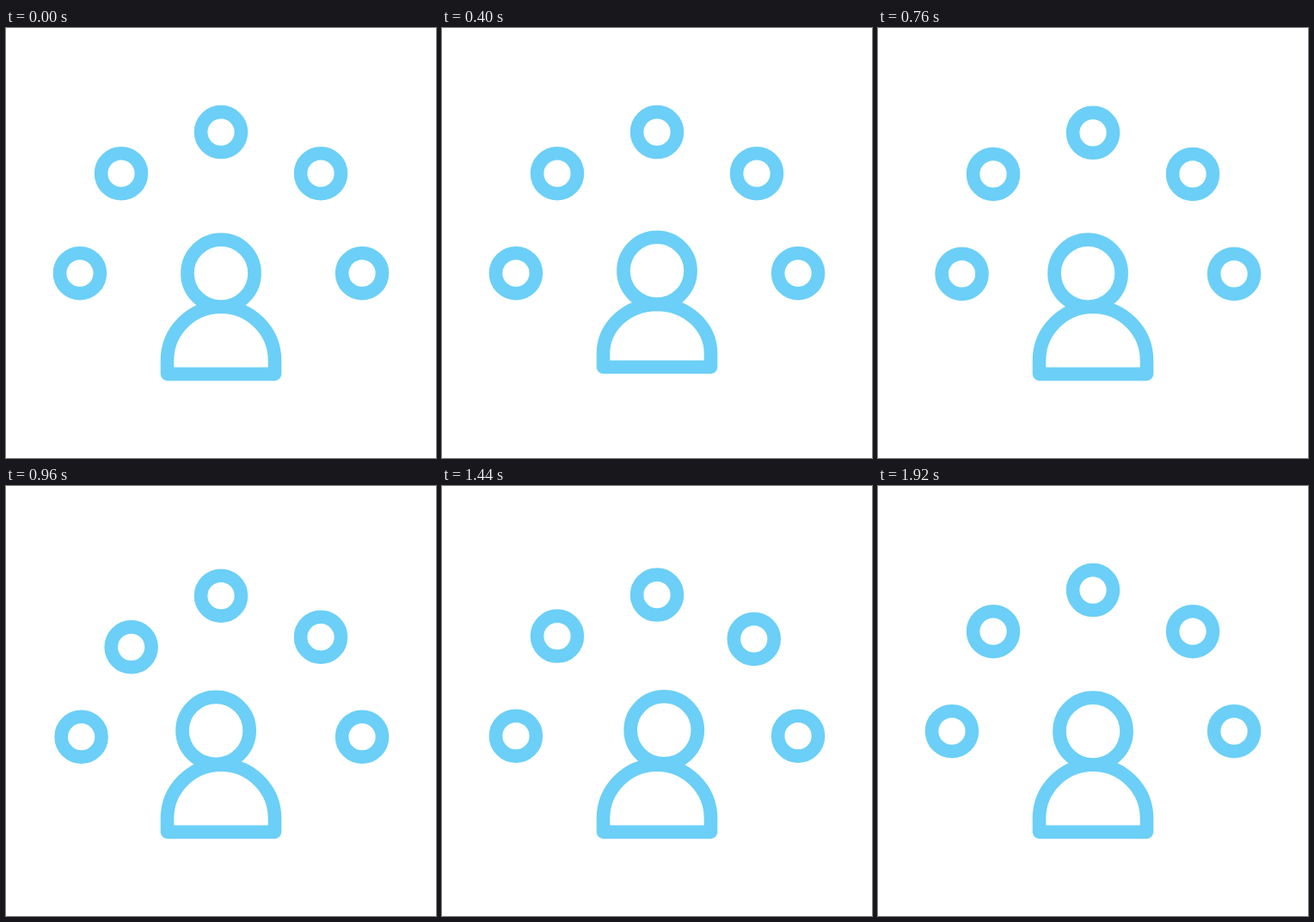
Write an HTML page that moves like this. It is 500x500 px and loops after 2120 ms.

```html
<!DOCTYPE html>
<html lang="en">
<head>
<meta charset="utf-8">
<title>Person and circles</title>
<style>
html, body { margin: 0; height: 100%; overflow: hidden; background: #fff; }
svg { display: block; width: 100%; height: 100%; }
</style>
</head>
<body>
<svg id="stage" viewBox="0 0 64 64" fill="none" stroke="#6bcff7" stroke-width="2" stroke-linejoin="round">
  <circle id="head" r="5"/>
  <path id="body"/>
</svg>
<script>
const LOOP = 2120, STEP = 40, CX = 32, CY = 36.5, ORBIT = 21;
const stage = document.getElementById('stage');
const head = document.getElementById('head');
const body = document.getElementById('body');

// Keys are [time in ms, value]; values are in 1/64 of the stage.
const topKeys = [[100, 0], [200, 0.75], [320, -3.5], [444, 0.9], [720, 0]];
const baseKeys = [[220, 0], [330, -3.45], [440, 0]];
const dipKeys = [[680, 0], [1200, 1.5], [1660, 0]];
const leanKeys = [[640, 0], [800, -0.9], [840, -0.9], [1620, 1.36], [1920, 0]];
const nudgePeaks = [822, 962, 1222, 1552, 1688];
const NUDGE = 2.11, NUDGE_HALF = 172;

const smooth = p => p * p * (3 - 2 * p);

function track(keys, t) {
  const i = keys.findIndex(k => t < k[0]);
  if (i < 0) return keys[keys.length - 1][1];
  if (i === 0) return keys[0][1];
  const [t0, a] = keys[i - 1], [t1, b] = keys[i];
  return a + (b - a) * smooth((t - t0) / (t1 - t0));
}

function place(circle, x, y) {
  circle.setAttribute('cx', x);
  circle.setAttribute('cy', y);
}

const dots = nudgePeaks.map(() => {
  const dot = head.cloneNode();
  dot.removeAttribute('id');
  dot.setAttribute('r', 3);
  return stage.appendChild(dot);
});

function draw(t) {
  const top = track(topKeys, t), base = track(baseKeys, t);
  const sweep = smooth(Math.min(1, Math.max(0, (t - 840) / 780)));
  const lift = 0.37 * 4 * sweep * (1 - sweep);
  place(head, CX + track(leanKeys, t), CY + top - lift);
  body.setAttribute('d',
    `M24 ${51.5 + base}v-2a8 ${8 + base - top} 0 0 1 16 0v2z`);

  const dip = track(dipKeys, t);
  dots.forEach((dot, i) => {
    const angle = i * Math.PI / 4;
    const near = Math.max(0, 1 - Math.abs(t - nudgePeaks[i]) / NUDGE_HALF);
    const r = ORBIT - NUDGE * smooth(near);
    place(dot, CX - r * Math.cos(angle), CY - r * Math.sin(angle) + dip);
  });
}

function tick() {
  draw(Math.floor(performance.now() % LOOP / STEP) * STEP);
  requestAnimationFrame(tick);
}
tick();
</script>
</body>
</html>
```
